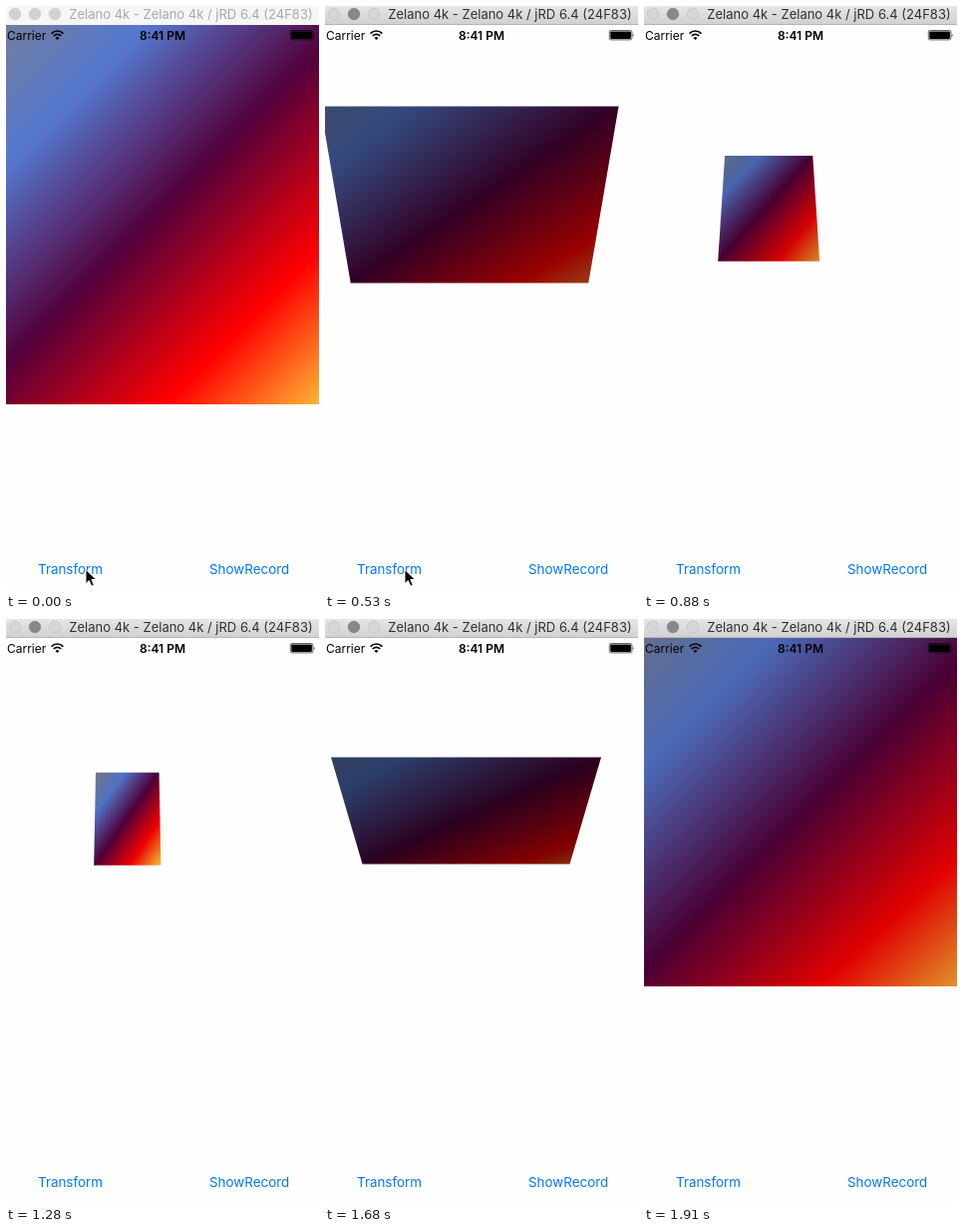
An HTML page for the animation above (2010 ms loop, 314 by 586 pixels).

```html
<!DOCTYPE html>
<html lang="en">
<head>
<meta charset="utf-8">
<title>Layer transform</title>
<style>
  html, body { margin: 0; width: 100%; height: 100%; overflow: hidden; background: #fefefe; }
  #stage { position: relative; width: 314px; height: 586px; overflow: hidden; background: #fefefe; }
  #card { position: absolute; left: -200px; top: -200px; width: 400px; height: 400px; }
  svg { position: absolute; left: 0; top: 0; font-family: Inter, "Liberation Sans", sans-serif; }
  .button { font-size: 13.4px; fill: #0078f5; }
</style>
</head>
<body>
<div id="stage">
  <div id="card"></div>
  <svg width="314" height="586" viewBox="0 0 314 586">
    <defs>
      <linearGradient id="chrome" x2="0" y2="1">
        <stop stop-color="#e6e6e6"/><stop offset="1" stop-color="#d0d0d0"/>
      </linearGradient>
    </defs>
    <rect id="bar" width="314" height="19"/>
    <rect id="barLine" y="18" width="314" height="1" fill="#b4b4b4"/>
    <g id="dots">
      <circle cx="9" cy="8" r="5.8"/><circle cx="29" cy="8" r="5.8"/><circle cx="49" cy="8" r="5.8"/>
    </g>
    <text id="title" x="185.5" y="13" font-size="13" text-anchor="middle">Zelano 4k - Zelano 4k / jRD 6.4 (24F83)</text>

    <text x="1" y="34" font-size="12">Carrier</text>
    <g fill="none" stroke="#000" stroke-width="1.7">
      <path d="M45.6 27.6a8 8 0 0 1 11.8 0M47.8 30a5 5 0 0 1 7.4 0"/>
      <path d="M51.5 34l-2-2.1a2.8 2.8 0 0 1 4 0z" fill="#000" stroke="none"/>
    </g>
    <text x="157" y="34" font-size="12" font-weight="600" text-anchor="middle">8:41 PM</text>
    <rect x="285.3" y="24.5" width="22.6" height="9.4" rx="1.6" fill="none" stroke="#000" stroke-width=".6"/>
    <rect x="286.3" y="25.5" width="20.6" height="7.4" rx=".8"/>
    <path d="M308.8 27.6q1.6 1.7 0 3.4z"/>

    <text id="transform" class="button" x="32" y="569">Transform</text>
    <text class="button" x="204" y="569">ShowRecord</text>
    <path id="cursor" d="M80 564.5v14.2l3.3-3.1 2.5 5.6 2.5-1.1-2.4-5.5h4.6z" stroke="#fff" stroke-width="1"/>
  </svg>
</div>
<script>
const $ = id => document.getElementById(id);
const LOOP = 2010, START = 180, STEP = 57.67, TURN = 1128;
const COLORS = "#808088, #5578d0, #54003c, #f00, #ffec44";

// time (ms) and progress of the outward move; the way back mirrors it
const KEYS = [[230, 0], [295, .0475], [346, .115], [526, .382], [577, .468], [641, .562], [872, .867], [980, .95], [1128, 1]];

const slope = (a, b) => (b[1] - a[1]) / (b[0] - a[0]);
const tangent = i => i === 0 || i === KEYS.length - 1 ? 0 : slope(KEYS[i - 1], KEYS[i + 1]);

function progress(time) {
  const t = time > TURN ? 2 * TURN - time : time;
  if (t <= KEYS[0][0]) return 0;
  const i = KEYS.findIndex(k => k[0] >= t) - 1;
  const [t0, p0] = KEYS[i], [t1, p1] = KEYS[i + 1];
  const d = t1 - t0, u = (t - t0) / d, v = 1 - u;
  return p0 * v * v * (1 + 2 * u) + p1 * u * u * (3 - 2 * u)
    + d * u * v * (tangent(i) * v - tangent(i + 1) * u);
}

// tilts edge-on, then swings in from the other side
const tilt = p => p < .6 ? Math.min(90, 130 * p + 420 * p ** 6) : (p - 1) * 225;

// the card darkens and its gradient spreads as it tilts
function drawCard(p) {
  const shade = Math.min(1.05 * p, 1.28 * (1 - p));
  const black = `rgba(0,0,0,${shade.toFixed(4)})`;
  const spread = `${100 * (1 + shade)}%`;
  const card = $("card");
  card.style.transform = `translate(${160.65 - 40.9 * p}px, 199px) scale(${1 - .8805 * p}, ${1 - .803 * p})`
    + ` perspective(1380px) rotateX(${-tilt(p)}deg)`;
  card.style.background = `linear-gradient(${black}, ${black}),`
    + ` linear-gradient(135deg, ${COLORS}) center / ${spread} ${spread}`;
}

function drawWindow(active) {
  $("bar").setAttribute("fill", active ? "url(#chrome)" : "#f6f6f6");
  $("barLine").setAttribute("opacity", active ? 1 : 0);
  $("title").setAttribute("fill", active ? "#303030" : "#a8a8a8");
  [...$("dots").children].forEach((dot, i) => {
    const filled = active && i === 1;
    dot.setAttribute("fill", filled ? "#88888c" : active ? "#d6d6d6" : "#d2d2d2");
    dot.setAttribute("stroke", filled ? "#808084" : active ? "#c2c2c2" : "#cacaca");
    dot.setAttribute("stroke-width", .7);
  });
}

function render(time) {
  const step = Math.min(30, Math.floor((time - START + 1) / STEP));
  const held = START + step * STEP;
  const active = step >= 0;
  drawCard(active ? progress(held) : 0);
  drawWindow(active);
  $("transform").setAttribute("opacity", active ? Math.min(1, .3 + (held - START) / 480) : 1);
  $("cursor").setAttribute("visibility", step < 9 ? "visible" : "hidden");
}

function tick() {
  render(performance.now() % LOOP);
  requestAnimationFrame(tick);
}
tick();
</script>
</body>
</html>
```
